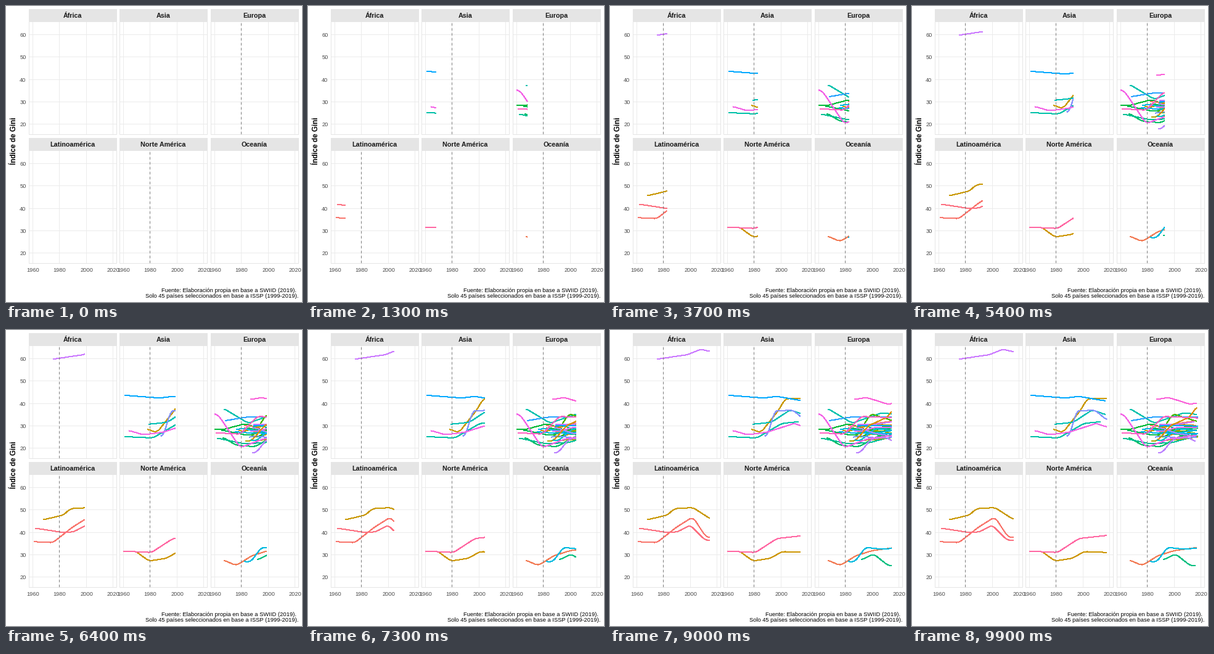
Animation of 480x480 px, one loop 10000 ms. Source, as a matplotlib script:

```python
import colorsys
import numpy as np
import matplotlib.pyplot as plt
from matplotlib.animation import FuncAnimation
from matplotlib.patches import Rectangle

plt.rcParams["font.family"] = "Liberation Sans"

SIZE, DPI, FRAMES = 480, 100, 100
PX = 72 / DPI                      # one pixel in points
PX_YEAR, PX_GINI = 2.158, 3.64
PANEL_W, PANEL_H = 142, 183
LEFTS, TOPS = (37, 184, 332), (25, 234)
NAMES = ["África", "Asia", "Europa", "Latinoamérica", "Norte América", "Oceanía"]
AF, AS, EU, LA, NA, OC = range(6)

fig = plt.figure(figsize=(SIZE / DPI, SIZE / DPI), dpi=DPI, facecolor="white")
ax = fig.add_axes([0, 0, 1, 1])
ax.set(xlim=(0, SIZE), ylim=(SIZE, 0))
ax.axis("off")


def hcl(hue, c=100, lum=65):
    """Polar LUV colour to sRGB."""
    h = np.radians(hue)
    y = ((lum + 16) / 116) ** 3
    u = c * np.cos(h) / (13 * lum) + 0.1978
    v = c * np.sin(h) / (13 * lum) + 0.4683
    x = 9 * y * u / (4 * v)
    z = -x / 3 - 5 * y + 3 * y / v
    rgb = np.array([3.2405 * x - 1.5371 * y - 0.4985 * z,
                    -0.9693 * x + 1.8760 * y + 0.0416 * z,
                    0.0556 * x - 0.2040 * y + 1.0572 * z])
    rgb = np.clip(rgb, 0, 1)
    return np.where(rgb > 0.0031308, 1.055 * rgb ** (1 / 2.4) - 0.055, 12.92 * rgb)


def to_x(panel, year):
    return LEFTS[panel % 3] + 6.7 + (year - 1960) * PX_YEAR


def to_y(panel, gini):
    return TOPS[panel // 3] + 21.2 + (60 - gini) * PX_GINI


def text(x, y, s, size, **kw):
    kw = {"color": "black", "ha": "center", "va": "baseline", **kw}
    ax.text(x, y, s, fontsize=size * PX, **kw)


def rule(xs, ys, color, **kw):
    """Crisp one-pixel line; coordinates sit on pixel centres."""
    return ax.plot(xs, ys, color=color, lw=PX, snap=False,
                   solid_capstyle="butt", dash_capstyle="butt", **kw)[0]


def draw_panel(p):
    x0, y0 = LEFTS[p % 3], TOPS[p // 3]
    x1, y1 = x0 + PANEL_W, y0 + PANEL_H
    for year in range(1960, 2021, 20):
        x = int(to_x(p, year)) + 0.5
        rule([x, x], [y0, y1], "#EBEBEB")
        if p >= 3:
            text(x, 431, str(year), 9.3, color="#4D4D4D")
    for gini in range(20, 61, 10):
        y = int(to_y(p, gini)) + 0.5
        rule([x0, x1], [y, y], "#EBEBEB")
        if p % 3 == 0:
            text(32.6, y + 3.3, str(gini), 9.3, color="#4D4D4D", ha="right")
    ax.add_patch(Rectangle((x0 + 0.5, y0 + 0.5), PANEL_W, PANEL_H, fill=False,
                           ec="#E5E5E5", lw=PX, zorder=2, snap=False))
    ax.add_patch(Rectangle((x0, y0 - 20), PANEL_W + 1, 20, fc="#E5E5E5", lw=0))
    text(x0 + 71, y0 - 6, NAMES[p], 10.7, weight="bold", color="#1A1A1A")


for p in range(6):
    draw_panel(p)
text(13.2, 219, "Índice de Gini", 11.6, weight="bold", rotation=90, va="center")
text(470.5, 464, "Fuente: Elaboración propia en base a SWIID (2019).", 9.35, ha="right")
text(474, 473, "Solo 45 países seleccionados en base a ISSP (1999-2019).", 9.35, ha="right")

series = []


def add(panel, hue, *turns):
    """Yearly series through (year, gini) turning points, rounded by a 5-year mean."""
    when, level = zip(*turns)
    years = np.arange(when[0], when[-1] + 1)
    padded = np.pad(np.interp(years, when, level), 2, mode="edge")
    gini = np.convolve(padded, np.ones(5) / 5, mode="valid")
    line, = ax.plot([], [], color=hcl(hue), lw=PX, zorder=3, antialiased=False,
                    solid_capstyle="butt", solid_joinstyle="round")
    series.append((panel, years, gini, line))


add(AF, 287, (1975, 59.7), (1998, 61.7), (2008, 64.1), (2016, 63))

add(AS, 63, (1978, 28.5), (1985, 27), (1999, 37.5), (2003, 42), (2018, 42.3))
add(AS, 180, (1961, 25.2), (1982, 24.6), (2001, 31.1), (2013, 31.8))
add(AS, 187, (1979, 30.7), (1993, 31.6), (2007, 37.1), (2017, 35))
add(AS, 240, (1961, 43.6), (1987, 42.4), (1997, 43.1), (2017, 41.1))
add(AS, 263, (1988, 25), (1991, 27), (1995, 36.6), (2009, 37), (2018, 32.6))
add(AS, 313, (1964, 27.9), (1975, 26), (1990, 27.2), (2010, 31.1), (2018, 29.5))

add(LA, 15, (1961, 35.8), (1975, 35.4), (1990, 42.4), (2002, 46.8), (2012, 37.8),
    (2016, 37.7))
add(LA, 63, (1968, 45.6), (1983, 47.7), (1988, 50.5), (2002, 51), (2016, 45.7))
add(LA, 7, (1962, 41.8), (1984, 39.8), (1991, 40.3), (2000, 43.2), (2011, 36.6),
    (2016, 36.3))

add(NA, 60, (1969, 31.6), (1979, 27.2), (1992, 28.4), (2001, 31.4), (2018, 31))
add(NA, 352, (1960, 31.6), (1981, 31), (1997, 37.2), (2018, 38.6))

add(OC, 23, (1967, 27.5), (1976, 25.2), (1988, 29.6), (2000, 31.8), (2017, 33.2))
add(OC, 160, (1992, 27.7), (2001, 30.4), (2012, 25.2), (2016, 25))
add(OC, 212, (1982, 27), (1987, 26.8), (1995, 33.3), (2008, 32.4), (2017, 33))

# Europe: the countries that stand out, then a seeded bundle converging near 28
add(EU, 135, (1960, 28.4), (1966, 28.3), (1983, 31), (1995, 28.3), (2018, 29))
add(EU, 143, (1965, 28.1), (1985, 25.7), (2004, 28.8), (2018, 29))
add(EU, 150, (1966, 24.9), (1976, 21.4), (1990, 20.7), (2005, 25.6), (2017, 25.5))
add(EU, 170, (1962, 24.5), (1982, 22), (1998, 22.5), (2018, 25.6))
add(EU, 182, (1967, 37.6), (1985, 31.2), (2008, 35.9), (2017, 35))
add(EU, 120, (1988, 25), (1999, 35.4), (2017, 32))
add(EU, 248, (1968, 32.3), (1984, 33.9), (2018, 34))

rng = np.random.default_rng(7)
BUNDLE = 20
for k in range(BUNDLE):
    start = int(1990 - 18 * rng.random() ** 2)
    low = rng.uniform(23, 31)
    mid = 0.5 * low + rng.uniform(12, 17)
    add(EU, 20 + 300 * k / BUNDLE, (start, low), (start + 4, low + rng.uniform(-0.8, 0.8)),
        (2002, mid), (rng.integers(2015, 2019), mid + rng.uniform(-1.5, 1.5)))

add(EU, 50, (1988, 23.5), (1997, 30), (2012, 34), (2017, 38.6))
add(EU, 280, (1988, 18), (1991, 18), (1999, 24), (2010, 25), (2016, 23))
add(EU, 313, (1960, 35.4), (1963, 34.5), (1979, 20.3), (1997, 24.3), (2017, 25.8))
add(EU, 322, (1987, 41.8), (1996, 42.6), (2012, 39.6), (2017, 40.2))
add(EU, 337, (1961, 26.9), (1979, 26.3), (1992, 34.2), (2018, 33.5))

markers = []
for p in range(6):
    x = int(to_x(p, 1980)) + 0.5
    top = TOPS[p // 3]
    mark = rule([x, x], [top + PANEL_H, top], "#7F7F7F", zorder=4, ls=(0, (4, 4)))
    spans = [(yrs[0], yrs[-1]) for q, yrs, _, _ in series if q == p]
    markers.append((mark, min(a for a, _ in spans), max(b for _, b in spans)))


def update(i):
    head = 1960 + 60 * i / (FRAMES - 1)
    for panel, years, gini, line in series:
        if head <= years[0]:
            line.set_data([], [])
            continue
        tip = min(head, years[-1])
        seen = years < tip
        t = np.append(years[seen], tip)
        g = np.append(gini[seen], np.interp(tip, years, gini))
        line.set_data(to_x(panel, t), to_y(panel, g))
    for mark, first, last in markers:
        mark.set_visible(first <= head <= last or i == FRAMES - 1)
    return []


anim = FuncAnimation(fig, update, frames=FRAMES, interval=100, repeat=True,
                     repeat_delay=0, init_func=lambda: update(0))
plt.show()
```
